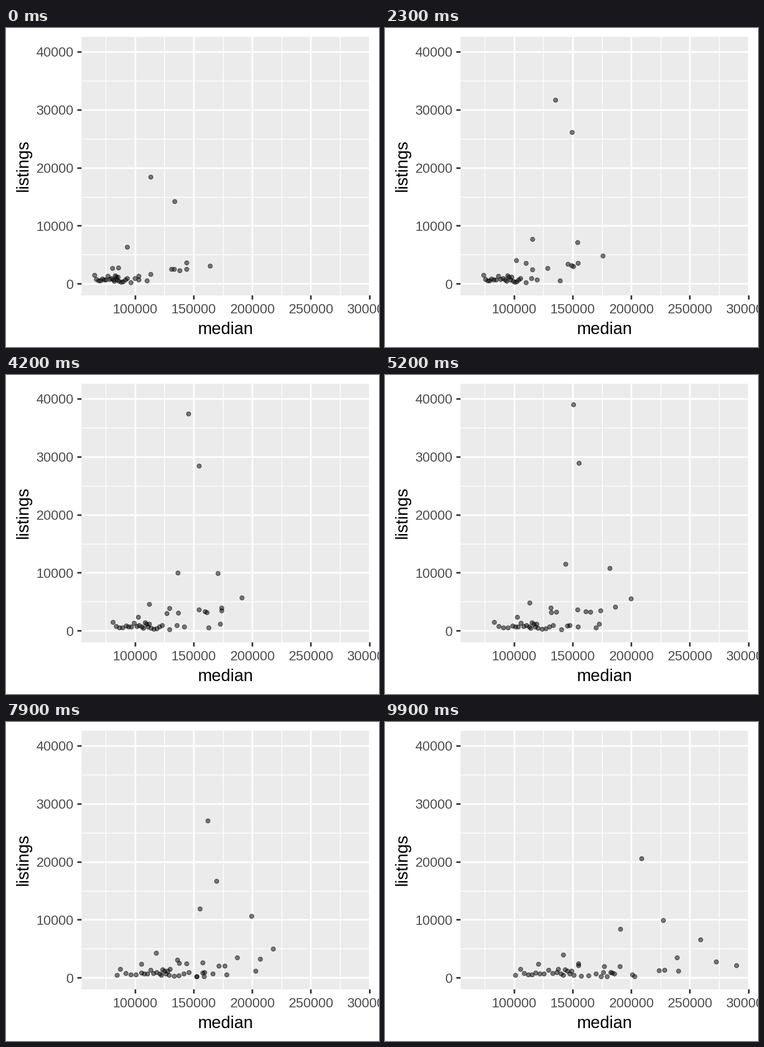
Animation, 810 px wide and 692 px high, one loop 10 s. Source, as a matplotlib script:

```python
import numpy as np
import matplotlib.pyplot as plt
from matplotlib.animation import FuncAnimation
from matplotlib.patches import Rectangle

W, H, DPI = 810, 692, 64
FRAMES = 100
PX = 72 / DPI  # one pixel in points
LEFT, RIGHT, TOP, BOTTOM = 164, 788.5, 18.5, 579.7

# Shared market trend: stage reached at each key time, and a mid-loop rise
KEYS = [0, 13, 32, 52, 64, 79, 99]
TREND = [0, 0.22, 1, 1.75, 2, 2.15, 3]
RISE = [0, 9, 15, 18, 14, 7, 0]
YEARS = np.linspace(0, FRAMES - 1, 16)

# The two largest markets share one yearly curve
PEAK_Y = [323, 290, 248, 180, 131, 107, 108, 42, 67, 152, 94, 113, 217, 288, 312, 296]
FIRST_X = [314, 355, 383, 409, 412, 438, 557]
SECOND_X = [366, 395, 416, 421, 425, 457, 604]

# Large markets: x and y per stage
LARGE = [
    ([263, 353, 405, 511], [475, 448, 397, 449]),
    ([392, 433, 506, 685], [509, 440, 412, 472]),
    ([443, 490, 548, 763], [516, 481, 486, 528]),
]

# Medium markets: x per stage, first and last y
MEDIUM = [
    ([244, 309, 315, 387], 520, 505),
    ([231, 350, 363, 420], 521, 524),
    ([288, 338, 368, 420], 538, 528),
    ([314, 376, 371, 510], 534, 530),
    ([359, 419, 418, 476], 523, 530),
    ([377, 427, 452, 607], 526, 538),
    ([365, 429, 438, 595], 523, 539),
    ([392, 435, 522, 719], 523, 520),
]

# Small markets: x against rank, one curve per stage
RANKS = [0, 1, 4, 8, 14, 20, 24]
SPREAD = [
    [306, 288, 263, 245, 233, 209, 192],
    [423, 355, 312, 297, 277, 244, 227],
    [469, 440, 383, 344, 325, 288, 240],
    [537, 498, 474, 410, 382, 327, 294],
]
SMALL_Y = [548, 546, 543, 552, 543, 546, 550, 551, 549, 540, 546, 540, 537,
           549, 546, 543, 545, 538, 546, 546, 544, 548, 548, 545, 536]
SMALL_X = np.array([np.interp(range(25), RANKS, row) for row in SPREAD])

# Markets that join later: first frame, three x, y
LATE = [
    (33, 468, 479, 634, 511),
    (40, 465, 525, 637, 540),
    (46, 396, 415, 493, 544),
    (40, 287, 287, 333, 525),
    (59, 350, 353, 376, 536),
    (66, 410, 410, 542, 552),
    (73, 404, 404, 469, 552),
    (73, 233, 233, 283, 549),
]


def positions(i):
    stage = np.interp(i, KEYS, TREND)

    def staged(values):
        return np.interp(stage, range(4), values)

    peak = np.interp(i, YEARS, PEAK_Y)
    gap = np.interp(i, [0, 13, 32, 52, 99], [53, 37, 99, 127, 134])
    pts = [(np.interp(i, KEYS, FIRST_X), peak),
           (np.interp(i, KEYS, SECOND_X), peak + gap)]

    pts += [(staged(xs), staged(ys)) for xs, ys in LARGE]

    rise = np.interp(i, KEYS, RISE)
    for xs, y0, y1 in MEDIUM:
        pts.append((staged(xs), y0 + (y1 - y0) * i / (FRAMES - 1) - rise))

    pts += [(staged(xs), y) for xs, y in zip(SMALL_X.T, SMALL_Y)]

    for start, *xs, y in LATE:
        if i >= start:
            pts.append((np.interp(stage, [1.75, 2, 3], xs), y))
    return pts


plt.rcParams["font.family"] = "Liberation Sans"
fig = plt.figure(figsize=(W / DPI, H / DPI), dpi=DPI, facecolor="white")
ax = fig.add_axes([0, 0, 1, 1])
ax.set(xlim=(0, W), ylim=(H, 0))
ax.axis("off")

panel = Rectangle((LEFT, TOP), RIGHT - LEFT, BOTTOM - TOP, fc="#EBEBEB", lw=0, zorder=0)
ax.add_patch(panel)


def line(xs, ys, color, width, zorder):
    return ax.plot(xs, ys, color=color, lw=width * PX, zorder=zorder,
                   solid_capstyle="butt")[0]


def label(x, y, text, size=29.3, color="#4D4D4D", **kw):
    kw = {"ha": "center", "va": "baseline", **kw}
    ax.text(x, y, text, fontsize=size * PX, color=color, **kw)


def grid_x(x, width, z):
    line([x, x], [TOP, BOTTOM], "white", width, z).set_clip_path(panel)


def grid_y(y, width, z):
    line([LEFT, RIGHT], [y, y], "white", width, z).set_clip_path(panel)


for k in range(5):
    x, y = 280.6 + 127.27 * k, 555.3 - 125.85 * k
    grid_x(x - 63.6, 1.75, 1)
    grid_x(x, 3.5, 2)
    grid_y(y, 3.5, 2)
    if k < 4:
        grid_y(y - 62.9, 1.75, 1)
    line([x, x], [BOTTOM, BOTTOM + 9.2], "#333333", 3.5, 3)
    line([LEFT - 9.2, LEFT], [y, y], "#333333", 3.5, 3)
    label(x, 618.6, str(100000 + 50000 * k))
    label(146.8, y + 10.3, str(10000 * k), ha="right")

label(477, 664.3, "median", 36.7, "black")
label(47, 299, "listings", 36.7, "black", rotation=90, rotation_mode="anchor")

dots = ax.scatter([], [], s=(9.2 * PX) ** 2, facecolor=(0, 0, 0, 0.5),
                  edgecolor=(0, 0, 0, 0.5), linewidth=1.6 * PX, zorder=5)


def update(i):
    dots.set_offsets(positions(i))
    return (dots,)


anim = FuncAnimation(fig, update, frames=FRAMES, interval=100, repeat=True,
                     repeat_delay=0, blit=False)
plt.show()
```
